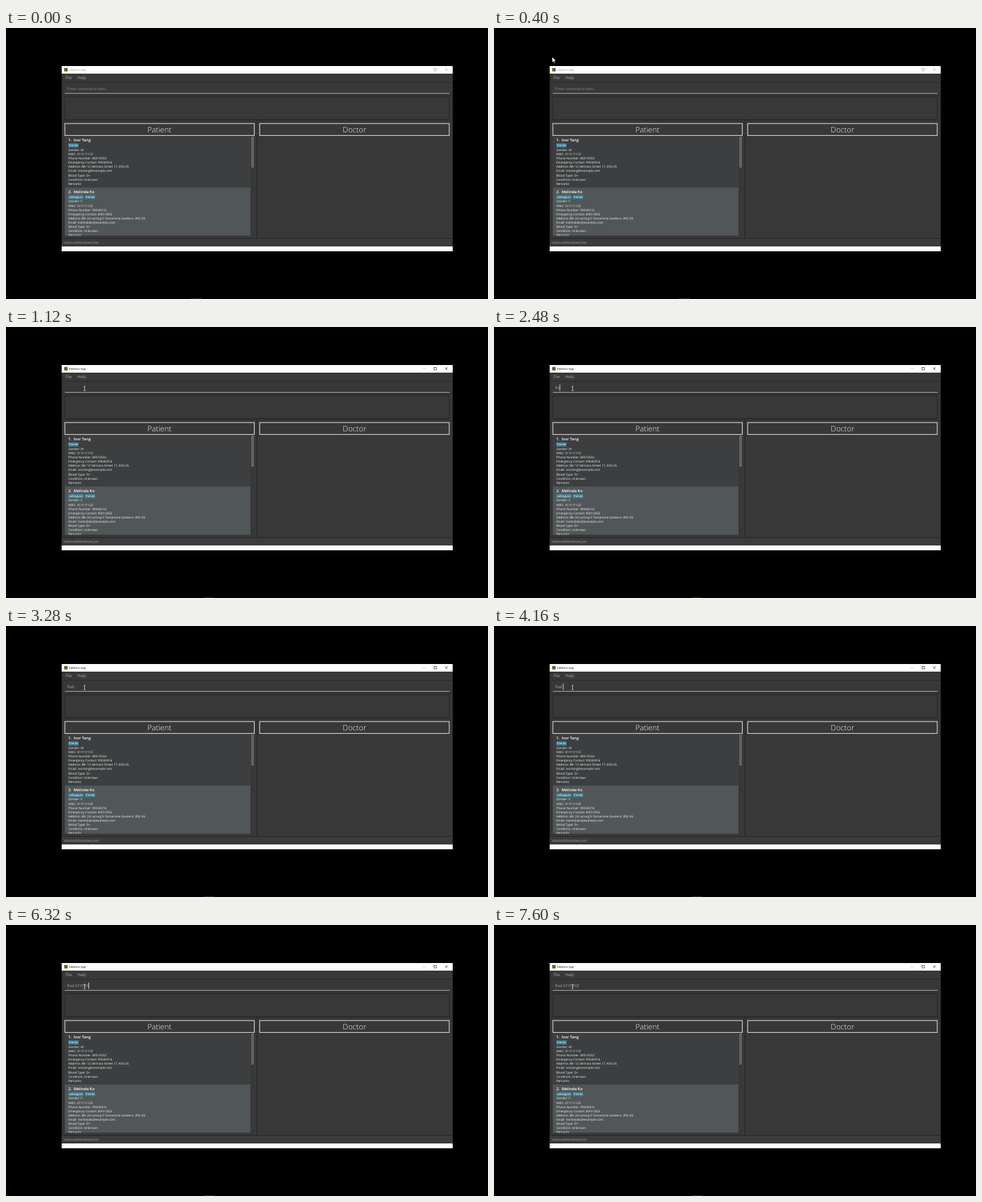
An HTML page for the animation above (8000 ms loop, 696 px wide and 392 px high).

```html
<!DOCTYPE html>
<html lang="en">
<head>
<meta charset="utf-8">
<title>Address App</title>
<style>
  html, body { margin: 0; width: 100%; height: 100%; overflow: hidden; background: #000; }
  svg { display: block; width: 696px; height: 392px; }
  text {
    font-family: "Open Sans", "Noto Sans", sans-serif;
    text-rendering: geometricPrecision;
    white-space: pre;
  }
  .light { font-weight: 300; }
  .line { font-size: 4.5px; fill: #f2f2f2; }
  .name { font-size: 5.6px; font-weight: 600; fill: #fff; }
  .tag { font-size: 4.1px; fill: #fff; }
  .heading { font-size: 11px; fill: #f4f4f4; text-anchor: middle; }
  .entry { font-size: 5.8px; }
  #ones { letter-spacing: -0.96px; }
</style>
</head>
<body>
<svg id="stage" viewBox="0 0 696 392">
  <defs>
    <clipPath id="listClip"><rect x="85" y="156" width="268" height="144.5"/></clipPath>
  </defs>
  <rect width="696" height="392" fill="#000"/>
  <rect id="taskMark" y="391" width="16" height="1" fill="#2c2c2c"/>

  <!-- window frame and title bar -->
  <rect x="80.5" y="55" width="564.5" height="268" fill="#383838"/>
  <rect x="80.5" y="55" width="564.5" height="11" fill="#fff"/>
  <rect x="84" y="57.8" width="5" height="5" fill="#6b6334"/>
  <g id="titleBar">
    <text x="91" y="62" font-size="4.2">Address App</text>
    <g fill="none" stroke="currentColor" stroke-width=".6">
      <path d="M602 60.5h3.6" opacity=".35"/>
      <rect x="618" y="58.6" width="3.4" height="3.4"/>
      <path d="M634 58.3l3.7 3.7m0-3.7l-3.7 3.7"/>
    </g>
  </g>

  <!-- menu and command field -->
  <g class="light" font-size="6" fill="#e4e4e4">
    <text x="86" y="74.2">File</text>
    <text x="103.2" y="74.2">Help</text>
  </g>
  <rect x="80.5" y="78" width="564.5" height="1" fill="#2b2b2b"/>
  <rect x="85" y="94" width="555.5" height="1" fill="#a2a2a2"/>
  <text id="hint" class="light entry" x="88" y="89.8" fill="#a8a8a8">Enter command here...</text>
  <text id="entry" class="light entry" x="88.4" y="89.8" fill="#f0f0f0"><tspan id="head"></tspan><tspan id="ones"></tspan><tspan id="tail"></tspan></text>
  <rect id="caret" y="83" width=".8" height="9.5" fill="#e8e8e8"/>

  <!-- result box -->
  <rect x="80.5" y="97" width="564.5" height="1" fill="#2d2d2d"/>
  <rect x="85" y="99.5" width="555" height="33" fill="#383838" stroke="#262626"/>
  <rect x="80.5" y="133.5" width="564.5" height="1" fill="#2d2d2d"/>

  <!-- panels -->
  <rect x="362" y="134" width="1" height="170" fill="#242424"/>
  <g fill="none" stroke="#dedede">
    <rect x="85" y="138.2" width="273.5" height="17.2"/>
    <rect x="366.3" y="138.2" width="273.7" height="17.2"/>
  </g>
  <text class="light heading" x="221.5" y="150.6">Patient</text>
  <text class="light heading" x="503.3" y="150.6">Doctor</text>
  <g id="list" clip-path="url(#listClip)"></g>
  <rect x="354" y="157" width="4" height="45" fill="#636363"/>

  <!-- status bar -->
  <rect x="80.5" y="304" width="564.5" height="1" fill="#272727"/>
  <rect x="80.5" y="305" width="564.5" height="11" fill="#3b3b3b"/>
  <text class="light" x="82.3" y="312.2" font-size="4.8" fill="#e0e0e0">.\data\addressbook.json</text>
  <rect x="80.5" y="316" width="564.5" height="7" fill="#fff"/>

  <!-- pointer -->
  <path id="arrow" d="M0 0v7.6l1.8-1.7 1.3 2.9 1.2-.5-1.3-2.8h2.5z" fill="#fff" stroke="#111" stroke-width=".4"/>
  <path id="beam" d="M-1.3-3h2.6M0-3v6M-1.3 3h2.6" fill="none" stroke="#d4d4d4" stroke-width=".8"/>
</svg>
<script>
const LOOP = 8000;
const COMMAND = 'find S1111111Z';
const $ = id => document.getElementById(id);

const patients = [
  { top: 156, height: 74.3, fill: '#3c3e3f', name: '1.  Ivor Tang', tags: [['friends', 15]],
    lines: ['Gender: M', 'NRIC: S1111111Z', 'Phone Number: 80015502', 'Emergency Contact: 90040316',
      'Address: Blk 12 Velmora Street 17, #03-25', 'Email: ivortang@example.com'] },
  { top: 230.6, height: 74.3, fill: '#515658', name: '2.  Melinda Ko', tags: [['colleagues', 22], ['friends', 15]],
    lines: ['Gender: F', 'NRIC: S1111112Z', 'Phone Number: 90040316', 'Emergency Contact: 80015502',
      'Address: Blk 24 Lorong 5 Tamarlone Gardens, #02-36', 'Email: melindako@example.com'] }
];
const commonLines = ['Blood Type: O+', 'Condition: Unknown', 'Remarks:'];

function add(tag, attrs, content = '') {
  const el = document.createElementNS('http://www.w3.org/2000/svg', tag);
  for (const key in attrs) el.setAttribute(key, attrs[key]);
  el.textContent = content;
  $('list').append(el);
}

for (const p of patients) {
  add('rect', { x: 85, y: p.top, width: 268, height: p.height, fill: p.fill });
  add('text', { class: 'name', x: 90, y: p.top + 8 }, p.name);
  let x = 90;
  for (const [label, width] of p.tags) {
    add('rect', { x, y: p.top + 10.8, width, height: 6.2, rx: .8, fill: '#3e7b91' });
    add('text', { class: 'tag', x: x + .8, y: p.top + 15.3 }, label);
    x += width + 2;
  }
  [...p.lines, ...commonLines].forEach((line, i) =>
    add('text', { class: 'line', x: 90, y: p.top + 21.8 + i * 6.13 }, line));
}

// time, typed characters, caret visible
const typing = [
  [0, 0, 0], [1200, 0, 1], [1680, 0, 0], [2160, 0, 1],
  [2320, 1, 1], [2400, 2, 1], [2480, 3, 1], [2640, 4, 1], [2800, 5, 1],
  [3280, 5, 0], [3840, 5, 1], [4320, 5, 0], [4400, 6, 1], [4880, 6, 0],
  [5040, 7, 1], [5280, 8, 1], [5440, 9, 1], [5680, 10, 1], [5920, 11, 1],
  [6080, 12, 1], [6320, 13, 1], [7120, 14, 1], [7600, 14, 0]
];

// time, pointer x, pointer y
const pointer = [
  [240, 62, 2], [320, 72, 20], [400, 84, 42], [480, 96, 62],
  [560, 106, 77], [640, 111, 85], [720, 113.5, 89]
];

const stepAt = (steps, t) => steps.findLast(step => step[0] <= t);
const show = (id, on) => $(id).setAttribute('visibility', on ? 'visible' : 'hidden');

function drawEntry(t) {
  const [, count, caretOn] = stepAt(typing, t);
  const typed = COMMAND.slice(0, count);
  $('head').textContent = typed.slice(0, 6);
  $('ones').textContent = typed.slice(6, 13);
  $('tail').textContent = typed.slice(13);
  const width = count ? $('entry').getComputedTextLength() : 0;
  $('caret').setAttribute('x', 88.2 + width);
  show('caret', caretOn);
  show('hint', t < 1120);
}

function drawPointer(t) {
  const step = stepAt(pointer, t);
  const inField = step && step[2] > 79;
  show('arrow', step && !inField);
  show('beam', inField);
  if (step) $(inField ? 'beam' : 'arrow').setAttribute('transform', `translate(${step[1]} ${step[2]})`);
}

function draw(t) {
  const active = t >= 1120;
  const ink = active ? '#111' : '#999';
  $('titleBar').setAttribute('fill', ink);
  $('titleBar').setAttribute('color', ink);
  $('taskMark').setAttribute('x', active ? 285 : 267);
  drawEntry(t);
  drawPointer(t);
}

const start = performance.now();
function frame() {
  draw((performance.now() - start) % LOOP);
  requestAnimationFrame(frame);
}
frame();
</script>
</body>
</html>
```
